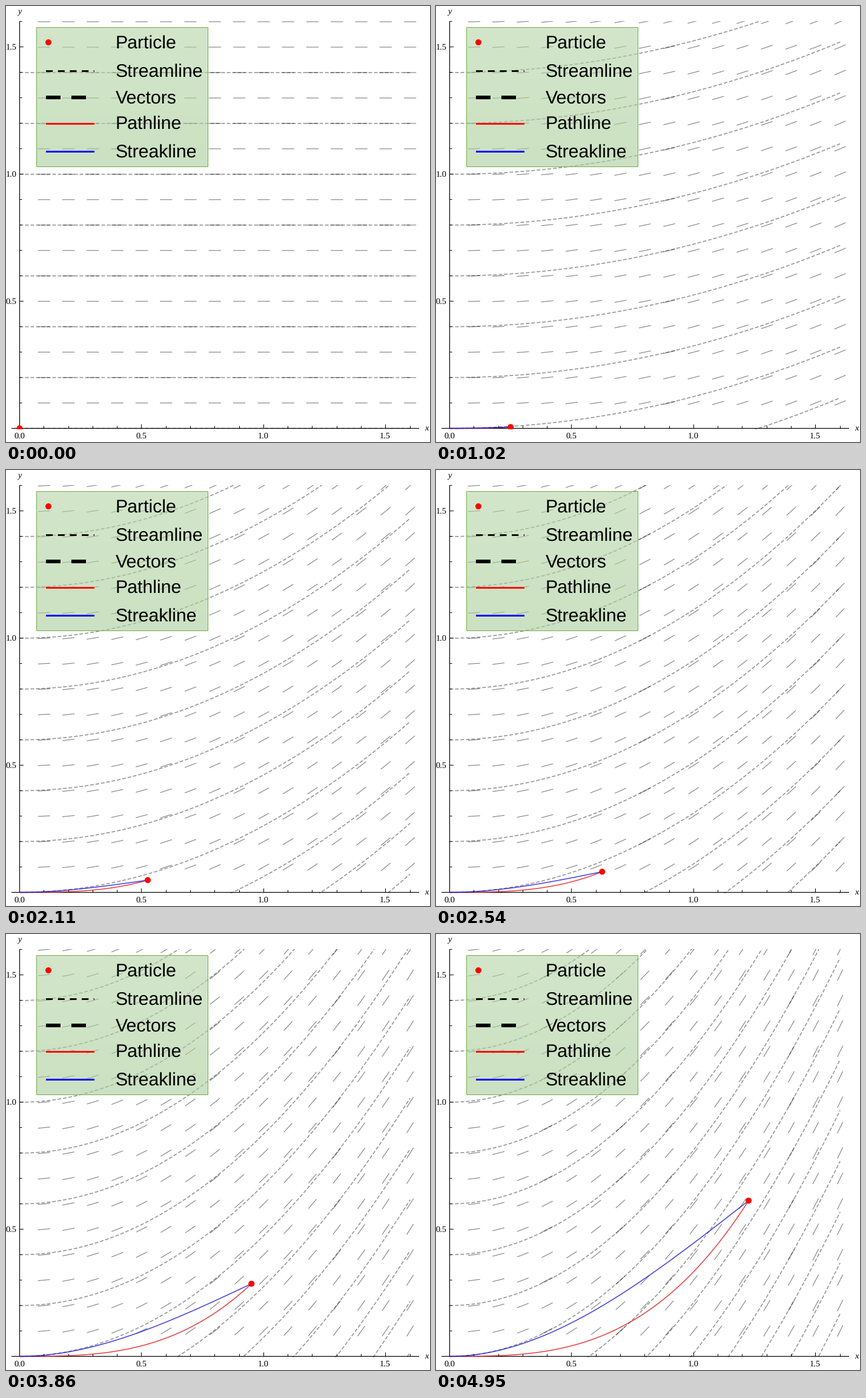
Write a matplotlib script that moves like this. It is 700 by 720 pixels and loops after 5010 ms.

```python
import numpy as np
import matplotlib.pyplot as plt
from matplotlib.animation import FuncAnimation
from matplotlib.collections import LineCollection
from matplotlib.colors import LinearSegmentedColormap
from matplotlib.patches import Circle, Rectangle

W, H = 700, 720
X0, Y0, SX, SY = 22.5, 697.5, 402.9, 419.7
LOOP, INTERVAL = 5010, 30
DT, STEP_MS = 0.025, 100

plt.rcParams.update({"lines.scale_dashes": False, "path.snap": False,
                     "text.hinting": "none"})
fig = plt.figure(figsize=(W / 72, H / 72), dpi=72, facecolor="white")
ax = fig.add_axes([0, 0, 1, 1])
ax.axis("off")


def px(x, y):
    """Flow coordinates to stage pixels, as (..., 2)."""
    x, y = np.broadcast_arrays(x, y)
    return np.stack([X0 + SX * x, Y0 - SY * y], axis=-1)


def line(x, y, color="black", lw=1.2, **kw):
    return ax.plot(x, y, color=color, lw=lw, solid_capstyle="butt",
                   dash_capstyle="butt", **kw)[0]


def label(x, y, text, size=14.4, font="Liberation Serif", **kw):
    ax.text(x, y, text, fontsize=size, family=font, **kw)


# Axes, ticks and tick labels
line([9, 682], [Y0, Y0], zorder=2)
line([X0, X0], [25, Y0], zorder=2)
for k in range(17):
    size = 6.5 if k % 5 == 0 else 4
    tx, ty = np.floor(px(k / 10, k / 10)) + 0.5
    line([tx, tx], [Y0, Y0 - size], lw=1, zorder=2)
    line([X0, X0 + size], [ty, ty], lw=1, zorder=2)
    if k % 5 == 0:
        name = f"{k / 10:.1f}"
        label(tx - 0.5, 714, name, ha="center")
        if k:
            label(17.5, ty + 4.5, name, ha="right")
label(19, 13, "y", style="italic")
label(691, 701, "x", style="italic")

# Flow field u = 1, v = x t
clip = Rectangle((0, 25), W, 674, transform=ax.transData)
gx, gy = np.meshgrid(np.arange(1, 17) / 10, np.arange(1, 17) / 10)
gx, gy = gx.ravel(), gy.ravel()
sx = np.linspace(0, 1.6, 81)
starts = np.arange(-7, 8) / 5

vectors = LineCollection([], colors="black", linewidths=1.1, alpha=0.5, zorder=3)
streams = LineCollection([], colors="black", linewidths=1.6, alpha=0.42,
                         linestyles=[(0, (6, 3))], zorder=3)
ax.add_collection(vectors, autolim=False)
ax.add_collection(streams, autolim=False)
path = line([], [], (0.87, 0.05, 0.05), 1.5, alpha=0.8, zorder=4)
streak = line([], [], (0.05, 0.05, 0.85), 1.5, alpha=0.8, zorder=5)
dot = ax.add_patch(Circle((X0, Y0), 5, color="red", lw=0, zorder=6))
for art in (vectors, streams, path, streak, dot):
    art.set_clip_path(clip)

# Legend
greens = LinearSegmentedColormap.from_list("greens", ["#b5d5a7", "#aace99"])
ax.imshow(np.linspace(0, 1, 230)[:, None], cmap=greens, alpha=0.6,
          extent=(50.5, 333.5, 265.5, 35.5), aspect="auto", zorder=8)
ax.add_patch(Rectangle((50.5, 35.5), 283, 230, fill=False,
                       ec="#70ad47", lw=1, zorder=9))
ax.add_patch(Circle((70, 60), 5, color="red", lw=0, zorder=10))
for y, color, lw, style in [(107.5, "black", 2.8, (0, (11.2, 8.5))),
                            (151, "black", 6, (0, (24, 18))),
                            (194.5, "red", 3, "-"),
                            (240.5, "blue", 3, "-")]:
    line([66, 146], [y, y], color, lw, ls=style, zorder=10)
for y, name in [(71, "Particle"), (118, "Streamline"), (161, "Vectors"),
                (204, "Pathline"), (251, "Streakline")]:
    label(180.5, y, name, 30.2, "Liberation Sans", zorder=10)
ax.set_xlim(0, W)
ax.set_ylim(H, 0)


def update(i):
    t = DT * (i * INTERVAL // STEP_MS)
    slope = gx * t
    dx = 0.025 / np.hypot(1, slope)
    dy = dx * slope
    vectors.set_segments(np.stack([px(gx - dx, gy - dy),
                                   px(gx + dx, gy + dy)], axis=1))
    streams.set_segments([px(sx, y + t * sx**2 / 2) for y in starts])
    x = np.linspace(0, t, 60)
    path.set_data(*px(x, x**3 / 3).T)
    streak.set_data(*px(x, t * x**2 / 2 - x**3 / 6).T)
    dot.center = tuple(px(t, t**3 / 3))
    return vectors, streams, path, streak, dot


anim = FuncAnimation(fig, update, frames=LOOP // INTERVAL, interval=INTERVAL,
                     repeat=True, repeat_delay=0, blit=False)
plt.show()
```
